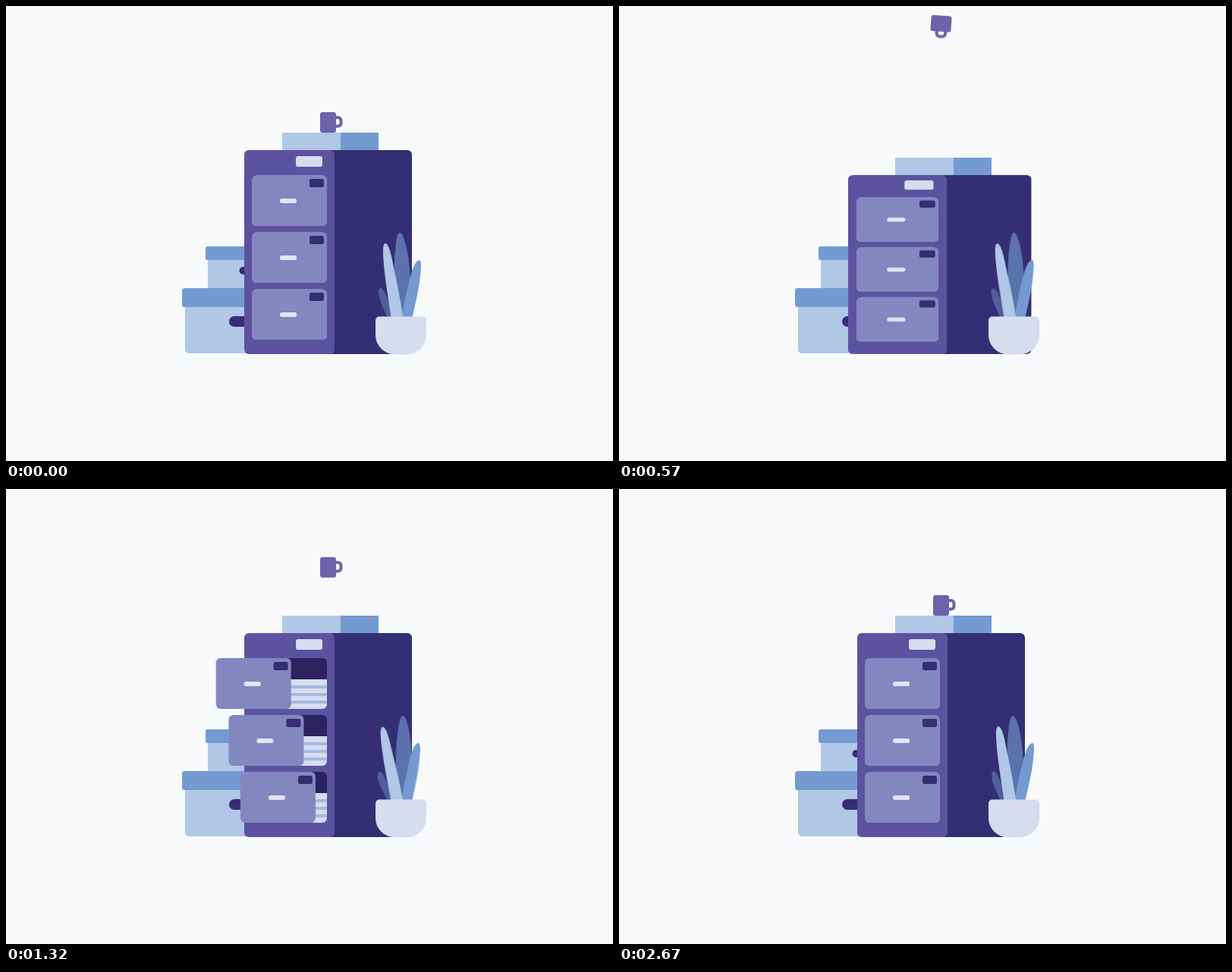
Write an HTML page that moves like this. It is 800 by 600 pixels and loops after 2.73 s.

```html
<!DOCTYPE html>
<html lang="en">
<head>
<meta charset="utf-8">
<title>Filing cabinet</title>
<style>
  html, body { margin: 0; width: 100%; height: 100%; overflow: hidden; background: #f8f9fb; }
  svg { display: block; width: 800px; height: 600px; }

  .navy { fill: #362e75; }
  .blue { fill: #739bd2; }
  .sky { fill: #b0c7e6; }
  .mist { fill: #d7dcee; }

  .move { animation: 2730ms cubic-bezier(.3333, 0, .6667, 1) infinite; }

  .cabinet { transform-origin: 424.5px 459px; animation-name: squash; }
  @keyframes squash {
    0% { transform: translateX(0) scale(1, 1); }
    17.58%, 18.68% { transform: translateX(-2.05px) scale(1.123, .835); }
    27.47% { transform: translateX(-.7px) scale(.9335, 1.1); }
    32.97%, 100% { transform: translateX(0) scale(1, 1); }
  }

  .book { animation-name: toss; }
  @keyframes toss {
    0% { transform: translateY(0); }
    17.58% { transform: translateY(44.4px); }
    18.68% { transform: translateY(44.4px); animation-timing-function: ease-in; }
    20.88% { transform: translateY(33px); }
    29.67% { transform: translateY(-137.5px); }
    38.46%, 100% { transform: translateY(0); }
  }
  .book-spin { transform-origin: 427.5px 178.5px; animation-name: book-spin; }
  @keyframes book-spin {
    0%, 20.88% { transform: rotate(0deg); }
    38.46%, 100% { transform: rotate(360deg); }
  }

  .ride { animation-name: ride; }
  @keyframes ride {
    0% { transform: translateY(0); }
    17.58%, 18.68% { transform: translateY(44.4px); }
    32.97%, 100% { transform: translateY(0); }
  }
  .mug { animation-name: launch; }
  @keyframes launch {
    0%, 15.38% { transform: translateY(0); }
    27.47%, 35.16% { transform: translateY(-393px); }
    52.2%, 100% { transform: translateY(0); }
  }
  .mug-spin { transform-origin: 424.5px 153.5px; animation-name: mug-spin; }
  @keyframes mug-spin {
    0%, 14.29% { transform: rotate(0deg); }
    34.07%, 100% { transform: rotate(360deg); }
  }

  /* All drawers start together; lower ones open more slowly. */
  .top { animation-name: top; }
  .middle { animation-name: middle; }
  .bottom { animation-name: bottom; }
  @keyframes top {
    0%, 35.16% { transform: translateX(0); }
    50.55% { transform: translateX(-50px); }
    65.93%, 100% { transform: translateX(0); }
  }
  @keyframes middle {
    0%, 35.16% { transform: translateX(0); }
    58.17% { transform: translateX(-50px); }
    74.65%, 100% { transform: translateX(0); }
  }
  @keyframes bottom {
    0%, 35.16% { transform: translateX(0); }
    71.43% { transform: translateX(-50px); }
    86.81%, 100% { transform: translateX(0); }
  }

  .leaf { animation-name: sway; }
  @keyframes sway {
    0%, 98.9%, 100% { transform: rotate(0deg); }
    49.45% { transform: rotate(var(--lean)); }
  }
</style>
</head>
<body>
<svg viewBox="0 0 800 600">
  <defs>
    <clipPath id="opening"><rect x="324" y="223" width="99" height="67" rx="6"/></clipPath>
    <g id="slot" clip-path="url(#opening)">
      <rect x="324" y="223" width="99" height="67" fill="#2d235f"/>
      <rect class="mist" x="324" y="251" width="99" height="39"/>
      <path d="M324 261h99M324 271h99M324 281h99" stroke="#a0bbe0" stroke-width="4"/>
    </g>
    <g id="drawer">
      <rect x="324" y="223" width="99" height="67" rx="6" fill="#8486c0"/>
      <rect class="navy" x="400" y="228" width="19" height="11" rx="2.5"/>
      <rect x="361" y="254" width="22" height="6" rx="2.5" fill="#e6e4f3"/>
    </g>
  </defs>

  <!-- boxes -->
  <rect class="sky" x="266" y="333" width="80" height="42"/>
  <rect class="blue" x="263" y="317" width="83" height="18" rx="2.5"/>
  <rect class="navy" x="307.5" y="344" width="36" height="10" rx="5"/>
  <rect class="sky" x="236" y="390" width="110" height="68" rx="5"/>
  <rect class="blue" x="232" y="372" width="114" height="25" rx="3.5"/>
  <rect class="navy" x="294" y="409" width="46" height="14" rx="7"/>

  <g class="move ride">
    <g class="move mug">
      <g class="move mug-spin">
        <rect x="414" y="140" width="21" height="27" rx="3" fill="#6c63aa"/>
        <path d="M434 147h3.500a4 4 0 0 1 4 4v3.500a4 4 0 0 1-4 4h-3.500" fill="none" stroke="#6c63aa" stroke-width="4"/>
      </g>
    </g>
  </g>

  <g class="move book">
    <g class="move book-spin">
      <rect class="sky" x="364" y="167" width="77.500" height="23"/>
      <rect class="blue" x="441" y="167" width="50" height="23"/>
    </g>
  </g>

  <g class="move cabinet">
    <rect class="navy" x="400" y="190" width="135" height="269" rx="6"/>
    <rect x="314" y="190" width="119" height="269" rx="6" fill="#5d52a0"/>
    <rect class="mist" x="382" y="198" width="35" height="14" rx="3"/>
    <use href="#slot"/>
    <use href="#slot" y="75"/>
    <use href="#slot" y="150"/>
    <use class="move top" href="#drawer"/>
    <use class="move middle" href="#drawer" y="75"/>
    <use class="move bottom" href="#drawer" y="150"/>
  </g>

  <!-- plant -->
  <path class="move leaf" style="--lean:-2deg; transform-origin:508px 415px" fill="#505e9c"
    d="M504 413C498 401 491 386 491 377C491 374 492 372 494 372C499 373 505 390 511 413Z"/>
  <path class="move leaf" style="--lean:2deg; transform-origin:524px 415px" fill="#5b72ad"
    d="M516 413C511 375 511 340 513 322C514 308 516 299 519 299C523 299 528 315 530 330C533 350 535 385 531 413Z"/>
  <path class="move leaf" style="--lean:-.9deg; transform-origin:528px 415px" fill="#739bd2"
    d="M521 413C526 385 533 352 538 342C541 337 543 335 545 335C548 336 547 347 546 356C544 375 539 395 535 413Z"/>
  <path class="move leaf" style="--lean:-2deg; transform-origin:516px 415px" fill="#b0c7e6"
    d="M508 413C503 380 497 345 497 322C497 316 498.500 313 500 313C503 313 506 321 508 330C514 360 520 385 523.500 413Z"/>
  <path class="mist" d="M492 409.500H549a5 5 0 0 1 5 5V434a26 25.500 0 0 1-26 25.500H513a26 25.500 0 0 1-26-25.500V414.500a5 5 0 0 1 5-5Z"/>
</svg>
</body>
</html>
```
